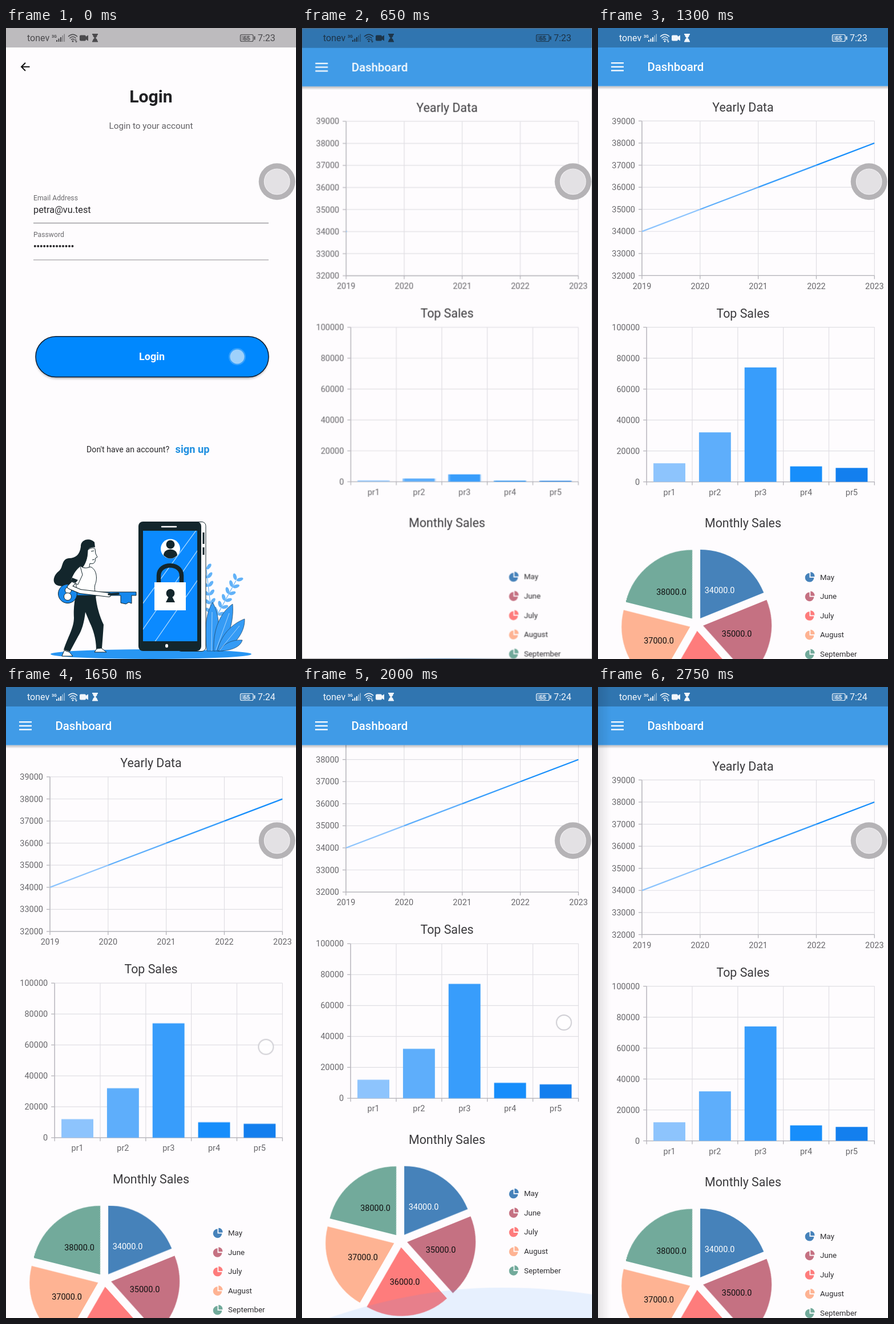
An HTML page that plays this animation: 508x1102 px, repeating every 2.8 s.

```html
<!DOCTYPE html>
<html lang="en">
<head>
<meta charset="utf-8">
<title>Login and dashboard</title>
<style>
  html, body { margin: 0; width: 100%; height: 100%; overflow: hidden; background: #fefcfe; }
  svg { display: block; width: 100%; height: 100%; }
  text { font-family: Roboto, "Liberation Sans", sans-serif; }
  .mid { text-anchor: middle; }
  .end { text-anchor: end; }
  .title { font-size: 21.4px; fill: #3c3b3e; text-anchor: middle; }
  .axis { font-size: 14.5px; fill: #68676b; }
  .grid, .rule { fill: none; }
  .grid { stroke: #e0dfe4; stroke-width: 1.2; }
  .rule { stroke: #b4b3b9; stroke-width: 1.3; }
  .ink { fill: #13262c; }
  .skin { fill: #fff; stroke: #13262c; stroke-width: 1; }

  #page, #scrim, #scroll, #trace, #values, #edge, #bar, .col, .slice, .clock, .touch {
    animation: 2800ms linear infinite;
  }
  #page { transform-origin: 254px 551px; animation-name: zoom; }
  @keyframes zoom {
    0%, 21.4% { opacity: 0; transform: scale(.95); }
    21.42% { opacity: .65; transform: scale(.965); }
    22.3% { opacity: 1; transform: scale(.99); }
    23.21% { opacity: 1; transform: scale(.9985); }
    23.6%, 100% { opacity: 1; transform: scale(1); }
  }
  #scrim { animation-name: dim; }
  @keyframes dim { 0%, 21.4% { opacity: 0; } 22%, 100% { opacity: .45; } }

  #bar { animation-name: tint; animation-timing-function: step-end; }
  @keyframes tint { 0% { color: #4b4a4d; } 21.4% { color: #1d3448; } 24.5%, 100% { color: #f1f6fb; } }
  .clock { animation-name: before; animation-timing-function: step-end; }
  .clock.next { animation-name: after; }
  @keyframes before { 0% { opacity: 1; } 57.1%, 100% { opacity: 0; } }
  @keyframes after { 0% { opacity: 0; } 57.1%, 100% { opacity: 1; } }

  .col { transform-box: fill-box; transform-origin: 50% 100%; animation-name: grow; }
  @keyframes grow {
    0%, 22.68% { transform: scaleY(0); animation-timing-function: cubic-bezier(.3333, .6667, .6667, 1); }
    40.25%, 100% { transform: scaleY(1); }
  }
  #trace { animation-name: trace; }
  @keyframes trace {
    0%, 23.21% { clip-path: inset(-5px 100% -5px 0); animation-timing-function: cubic-bezier(.3333, .6667, .6667, 1); }
    40.82%, 100% { clip-path: inset(-5px 0% -5px 0); }
  }
  .slice { fill: none; stroke-width: 120; animation-name: fan; }
  @keyframes fan {
    0%, 22.68% { transform: rotate(-90deg) scale(0); stroke-dasharray: 0 360; }
    40.25%, 100% { transform: rotate(calc(var(--from) - 90deg)) scale(1); stroke-dasharray: var(--sweep) 360; }
  }
  #values { animation-name: values; }
  @keyframes values { 0%, 40.25% { opacity: 0; } 43%, 100% { opacity: 1; } }

  #scroll { animation-name: scroll; }
  @keyframes scroll {
    0%, 57.8% { transform: translateY(0); animation-timing-function: ease-in-out; }
    65%, 68.2% { transform: translateY(-103.6px); animation-timing-function: cubic-bezier(.35, .1, .4, 1); }
    80.3%, 100% { transform: translateY(0); }
  }
  #tap { animation-name: tap; }
  @keyframes tap { 0% { opacity: 1; } 7%, 100% { opacity: 0; } }
  #drag { animation-name: drag; }
  @keyframes drag {
    0%, 57.1% { opacity: 0; transform: translate(455px, 634px); }
    57.8% { opacity: 1; transform: translate(455px, 634px); animation-timing-function: ease-in-out; }
    65%, 68.2% { opacity: 1; transform: translate(461px, 530px); animation-timing-function: cubic-bezier(.35, .1, .4, 1); }
    76% { opacity: 1; transform: translate(457px, 630px); }
    78.5%, 100% { opacity: 0; transform: translate(457px, 634px); }
  }
  #edge { animation-name: edge; }
  @keyframes edge { 0%, 92.8% { opacity: 0; } 98.2%, 100% { opacity: 1; } }
</style>
</head>
<body>
<svg viewBox="0 0 508 1102" preserveAspectRatio="none">
  <defs>
    <linearGradient id="fall" x2="0" y2="1">
      <stop stop-color="#000" stop-opacity=".26"/><stop offset="1" stop-color="#000" stop-opacity="0"/>
    </linearGradient>
    <linearGradient id="side">
      <stop stop-color="#000" stop-opacity=".1"/><stop offset="1" stop-color="#000" stop-opacity="0"/>
    </linearGradient>
    <filter id="soft" x="-20%" y="-40%" width="140%" height="180%"><feGaussianBlur stdDeviation="2"/></filter>
    <clipPath id="glass"><path d="M240 878H335V1071H240Z"/></clipPath>
  </defs>

  <g id="login">
    <path fill="#fefcfe" d="M0 0H508V1102H0Z"/>
    <path fill="#bdbbbe" d="M0 0H508V34H0Z"/>
    <path d="M41.500 67.800H27.500M34 60.800L27 67.800L34 74.800" fill="none" stroke="#111" stroke-width="2"/>
    <text class="mid" x="254" y="130" font-size="30.2" font-weight="700" fill="#202023">Login</text>
    <text class="mid" x="254" y="176" font-size="15.3" fill="#636266">Login to your account</text>
    <g font-size="12.2" fill="#6c6b6f">
      <text x="48" y="300.500">Email Address</text>
      <text x="48" y="365">Password</text>
    </g>
    <text x="48" y="323" font-size="16.3" fill="#29282b">petra@vu.test</text>
    <g id="dots" fill="#29282b"></g>
    <path d="M48 340.700H460M48 405H460" stroke="#8f8e92" stroke-width="1.2"/>
    <rect x="53" y="541" width="406" height="71" rx="35" fill="#000" opacity=".35" filter="url(#soft)"/>
    <rect x="52" y="538.800" width="408" height="70.700" rx="35.300" fill="#0088fe" stroke="#0a1c2e" stroke-width="1.500"/>
    <text class="mid" x="255.500" y="580" font-size="18" font-weight="700" fill="#f4f9ff">Login</text>
    <text x="141" y="741" font-size="14.2" fill="#29282b">Don't have an account?</text>
    <text x="296.500" y="742" font-size="18.300" font-weight="700" fill="#1f8fe0">sign up</text>

    <!-- illustration -->
    <ellipse cx="254" cy="1093.500" rx="176" ry="8.500" fill="#2896f3"/>
    <g id="plants" fill="#62b2f8" stroke="#62b2f8"></g>
    <g fill="#359bf5" stroke="#1c3f5c" stroke-width=".7">
      <path d="M352 1088C346 1050 351 1020 362 1003C376 1028 375 1062 366 1088Z"/>
      <path d="M364 1088C362 1050 376 1020 397 1006C400 1040 386 1072 374 1088Z"/>
      <path d="M370 1088C376 1062 394 1041 418 1032C419 1060 394 1082 380 1088Z"/>
      <path d="M372 1088C384 1073 398 1068 414 1069C410 1083 390 1088 372 1088Z"/>
      <path fill="none" stroke="#d8edff" d="M360 1088L361 1020M368 1086L391 1022M374 1087L409 1044"/>
    </g>
    <rect x="300" y="862.500" width="50" height="226" rx="7" class="skin"/>
    <path d="M346 881V901M346 907V920" stroke="#13262c" stroke-width="3"/>
    <rect x="232" y="862" width="110" height="226" rx="8" class="ink"/>
    <path fill="#0b8aff" d="M240 878H335V1071H240Z"/>
    <path d="M236 1056L340 906M236 1010L340 868M258 1076L340 958" stroke="#a9d8ff" stroke-width="1.300" clip-path="url(#glass)"/>
    <path d="M273 871H298" stroke="#fff" stroke-width="2.500" stroke-linecap="round"/>
    <ellipse cx="281.500" cy="1079" rx="2.500" ry="3.300" fill="#fff"/>
    <circle cx="288" cy="909.500" r="17" fill="#fff"/>
    <circle cx="288" cy="902" r="7.500" class="ink"/>
    <path class="ink" d="M276 921C276 907 300 907 300 921Q288 932 276 921Z"/>
    <path d="M267.500 971V956C268 933 307 933 307.500 956V971" fill="none" stroke="#13262c" stroke-width="7.500"/>
    <path fill="#fff" d="M260 968H315V1017H260Z"/>
    <path class="ink" d="M284.500 994A7.500 7.500 0 1 1 291.500 994L296 1003H280Z"/>

    <path class="ink" d="M155 898C147 889 130 893 131 906C129 920 122 926 110 926C96 928 101 943 92 949C82 957 80 971 92 974C112 979 124 967 131 951C136 940 142 930 146 918C140 910 148 906 156 907Z"/>
    <path class="skin" d="M143 912C148 907 155 907 156 910L157 918L160 924L156.500 926C157 934 153 937 147 935L145 945L134 942C140 934 143 924 143 912Z"/>
    <path d="M149 914L154 913M151 929L155 928" stroke="#13262c"/>
    <path class="skin" d="M130 939C136 945 143 943 148 941C160 946 160 964 156 972C154 980 157 986 157 993H122C125 976 122 964 119 955Z"/>
    <path class="ink" d="M122 991H157C159 1012 165 1030 171 1042C170 1058 169 1070 168 1083L158 1085C158 1066 152 1049 147 1039L139 1020C137 1038 133 1052 126 1063L112 1089L101 1086C108 1064 119 1048 119 1030C118 1014 120 1001 122 991Z"/>
    <path class="skin" d="M102 1087L111 1090L117 1097H98ZM159 1084L167 1083L176 1090H155Z"/>
    <g fill="#1688ed" stroke="#13262c">
      <path d="M120 985H228V991H220V1005L215 1003L210 1006L201 1004V991H120Z"/>
      <circle cx="108" cy="988" r="16.500"/>
      <g fill="#fff"><circle cx="109" cy="982" r="5.500"/><circle cx="108" cy="993" r="6.500"/></g>
    </g>
    <g fill="none" stroke-linejoin="round" stroke-linecap="round">
      <path d="M124 963L111 976L130 984L180 990" stroke="#13262c" stroke-width="8"/>
      <path d="M124 963L111 976L130 984L180 990" stroke="#fff" stroke-width="6"/>
      <path d="M180 989L197 988" stroke="#13262c" stroke-width="3.500"/>
    </g>
    <path class="skin" d="M130 940C122 946 116 956 113 966L126 972L134 955Z"/>
    <path class="ink" d="M116 960L126 964L122 969L113 966Z"/>

    <g id="tap" class="touch">
      <circle cx="405" cy="574" r="15" fill="#58b0fc" opacity=".6"/>
      <circle cx="405" cy="574" r="12.500" fill="#a0d2fb"/>
    </g>
  </g>
  <path id="scrim" d="M0 0H508V1102H0Z"/>

  <g id="page">
    <path fill="#fefcfe" d="M0 0H508V1102H0Z"/>
    <g id="scroll">
      <text class="title" x="254" y="145.800">Yearly Data</text>
      <text class="title" x="254" y="505.800">Top Sales</text>
      <text class="title" x="254" y="872">Monthly Sales</text>
      <g id="charts"></g>
      <g id="trace" stroke-width="2.300"></g>
      <g id="cols"></g>
      <g id="pie"></g>
      <g id="values" class="mid" font-size="14.500"></g>
      <g id="legend" font-size="13.300" fill="#2f2e31"></g>
      <path fill="#409cff" opacity=".12" d="M0 1194C100 1154 220 1123 350 1123C410 1123 460 1128 508 1135V1210H0Z"/>
    </g>
    <path fill="url(#fall)" d="M0 101.500H508V107.500H0Z"/>
    <path fill="#409be7" d="M0 34H508V101.500H0Z"/>
    <path fill="#3075b0" d="M0 0H508V34H0Z"/>
    <path d="M23 61.200H45M23 67.800H45M23 74.400H45" stroke="#fff" stroke-width="2.300"/>
    <text x="86.500" y="75" font-size="20.400" font-weight="500" fill="#fff">Dashboard</text>
    <path id="edge" fill="url(#side)" d="M0 0H22V1102H0Z"/>
  </g>

  <g id="drag" class="touch">
    <circle r="13" fill="#fff" fill-opacity=".75" stroke="#cfced4" stroke-width="2"/>
  </g>

  <g id="bar" fill="currentColor" stroke="none">
    <text x="37" y="23" font-size="16">tonev</text>
    <text x="80" y="16.500" font-size="7" font-weight="700">3G</text>
    <path d="M88 21H90V24H88ZM91.500 18.500H93.500V24H91.500ZM95 16H97V24H95Z"/>
    <path opacity=".55" d="M98.500 13H100V24H98.500ZM101.500 10.500H103V24H101.500Z"/>
    <g fill="none" stroke="currentColor" stroke-width="1.500">
      <path d="M109 15Q117 7.500 125 15M111.500 18Q117 12.500 122.500 18M114 20.500Q117 18 120 20.500"/>
      <rect x="410.500" y="11.500" width="22.500" height="12" rx="2.500" stroke-width="1.200"/>
    </g>
    <circle cx="117" cy="23" r="1.500"/>
    <path d="M120 22L122 19.500L124 22ZM121 23H125L123 25.500Z"/>
    <path d="M131 12.500H138Q140 12.500 140 15L144 12.500V22.500L140 20Q140 22.500 138 22.500H131Q129 22.500 129 20.500V14.500Q129 12.500 131 12.500Z"/>
    <path d="M151 10H161V12H160Q160 15 157 17.200Q160 19.500 160 22.500H161V24.500H151V22.500H152Q152 19.500 155 17.200Q152 15 152 12H151Z"/>
    <path opacity=".3" d="M412 13H426V22H412Z"/>
    <text class="mid" x="421.700" y="21.500" font-size="11">65</text>
    <path d="M434.500 14.500H436.500V20.500H434.500Z"/>
    <text class="clock" x="441" y="23" font-size="16">7:23</text>
    <text class="clock next" x="441" y="23" font-size="16">7:24</text>
  </g>

  <g>
    <circle cx="474.700" cy="268.300" r="32" fill="#b1afb2" opacity=".94"/>
    <circle cx="474.700" cy="268.300" r="22.300" fill="#e3e1e4" stroke="#efedf0" stroke-width="1.200"/>
  </g>
</svg>
<script>
  const svgNS = "http://www.w3.org/2000/svg";
  const $ = id => document.getElementById(id);

  function add(parent, tag, attrs, text) {
    const el = document.createElementNS(svgNS, tag);
    for (const key in attrs) el.setAttribute(key, attrs[key]);
    if (text !== undefined) el.textContent = text;
    parent.appendChild(el);
    return el;
  }
  const path = (parent, cls, d) => add(parent, "path", { class: cls, d });
  const label = (cls, x, y, text) => add($("charts"), "text", { class: cls, x, y }, text);

  const blues = ["#8dc4fd", "#5eaefb", "#389dfb", "#178efb", "#137fee"];

  // Password bullets
  for (let i = 0; i < 13; i++) add($("dots"), "circle", { cx: 50.8 + i * 5.47, cy: 381, r: 2 });

  // Leafy sprigs: a stem with paired leaves
  function sprig(x0, y0, x1, y1, pairs) {
    const turn = Math.atan2(y1 - y0, x1 - x0) * 180 / Math.PI;
    add($("plants"), "path", { d: `M${x0} ${y0}L${x1} ${y1}`, "stroke-width": 1.2 });
    for (let i = 0; i < pairs; i++) {
      const k = .2 + .8 * i / (pairs - 1);
      const at = `translate(${x0 + (x1 - x0) * k} ${y0 + (y1 - y0) * k})`;
      for (const side of [-45, 45])
        add($("plants"), "ellipse", { cx: 7, rx: 6, ry: 3, stroke: "none", transform: `${at} rotate(${turn + side})` });
    }
  }
  sprig(362, 1040, 351, 946, 6);
  sprig(362, 1040, 403, 965, 6);

  // Axes and grid
  function axes({ left, top, lines, max, step, cols, names, between }) {
    const right = 484.3, bottom = top + 270, g = $("charts");
    for (let i = 0; i <= lines; i++) {
      const y = top + 270 * i / lines;
      path(g, "grid", `M${left} ${y}H${right}`);
      path(g, "rule", `M${left - 6} ${y}H${left}`);
      label("axis end", left - 12, y + 5.1, max - i * step);
    }
    const w = (right - left) / cols;
    for (let i = 0; i <= cols; i++) {
      const x = left + w * i;
      path(g, "grid", `M${x} ${top}V${bottom}`);
      path(g, "rule", `M${x} ${bottom}v6`);
    }
    names.forEach((name, i) => label("axis mid", left + w * (i + (between ? .5 : 0)), bottom + 23.2, name));
    path(g, "rule", `M${left} ${top}V${bottom}H${right}`);
  }
  axes({ left: 77, top: 162.4, lines: 7, max: 39000, step: 1000, cols: 4, names: [2019, 2020, 2021, 2022, 2023] });
  axes({ left: 85.2, top: 522.6, lines: 5, max: 100000, step: 20000, cols: 5, between: true,
         names: ["pr1", "pr2", "pr3", "pr4", "pr5"] });

  for (let i = 0; i < 4; i++) {
    const x = 77 + 101.8 * i, y = 355.3 - 38.57 * i;
    add($("trace"), "path", { d: `M${x} ${y}l101.8 -38.57`, stroke: blues[i] });
  }
  [12, 32, 74, 10, 9].forEach((v, i) => add($("cols"), "rect", {
    class: "col", x: 97.1 + 79.82 * i, y: 792.6 - 2.7 * v, width: 55.9, height: 2.7 * v, fill: blues[i]
  }));

  // Pie with every slice pushed out along its middle
  const months = [
    ["May", "#4682ba", 34, 213, 987], ["June", "#c57182", 35, 243, 1062.5], ["July", "#fe7c7c", 36, 180, 1118.5],
    ["August", "#feb393", 37, 106.5, 1075], ["September", "#72aa9b", 38, 128.5, 989.5]
  ];
  let from = 0;
  months.forEach(([name, color, value, x, y], i) => {
    const sweep = value * 2, mid = (from + sweep / 2) * Math.PI / 180;
    const spot = add($("pie"), "g", {
      transform: `translate(${172.4 + 12 * Math.sin(mid)} ${1041 - 12 * Math.cos(mid)})`
    });
    add(spot, "circle", {
      class: "slice", r: 60, pathLength: 360, stroke: color, style: `--from:${from}deg;--sweep:${sweep}`
    });
    from += sweep;
    add($("values"), "text", { x, y, fill: i ? "#111" : "#fff" }, value + "000.0");

    const row = 959 + 33.6 * i;
    add($("legend"), "path", {
      fill: color, transform: `translate(370.5 ${row})`,
      d: "M0 1V-7A7.800 7.800 0 1 0 7.800 1ZM1.800 -.8V-9A7.500 7.500 0 0 1 9 -.8Z"
    });
    add($("legend"), "text", { x: 389, y: row + 4.5 }, name);
  });
</script>
</body>
</html>
```
